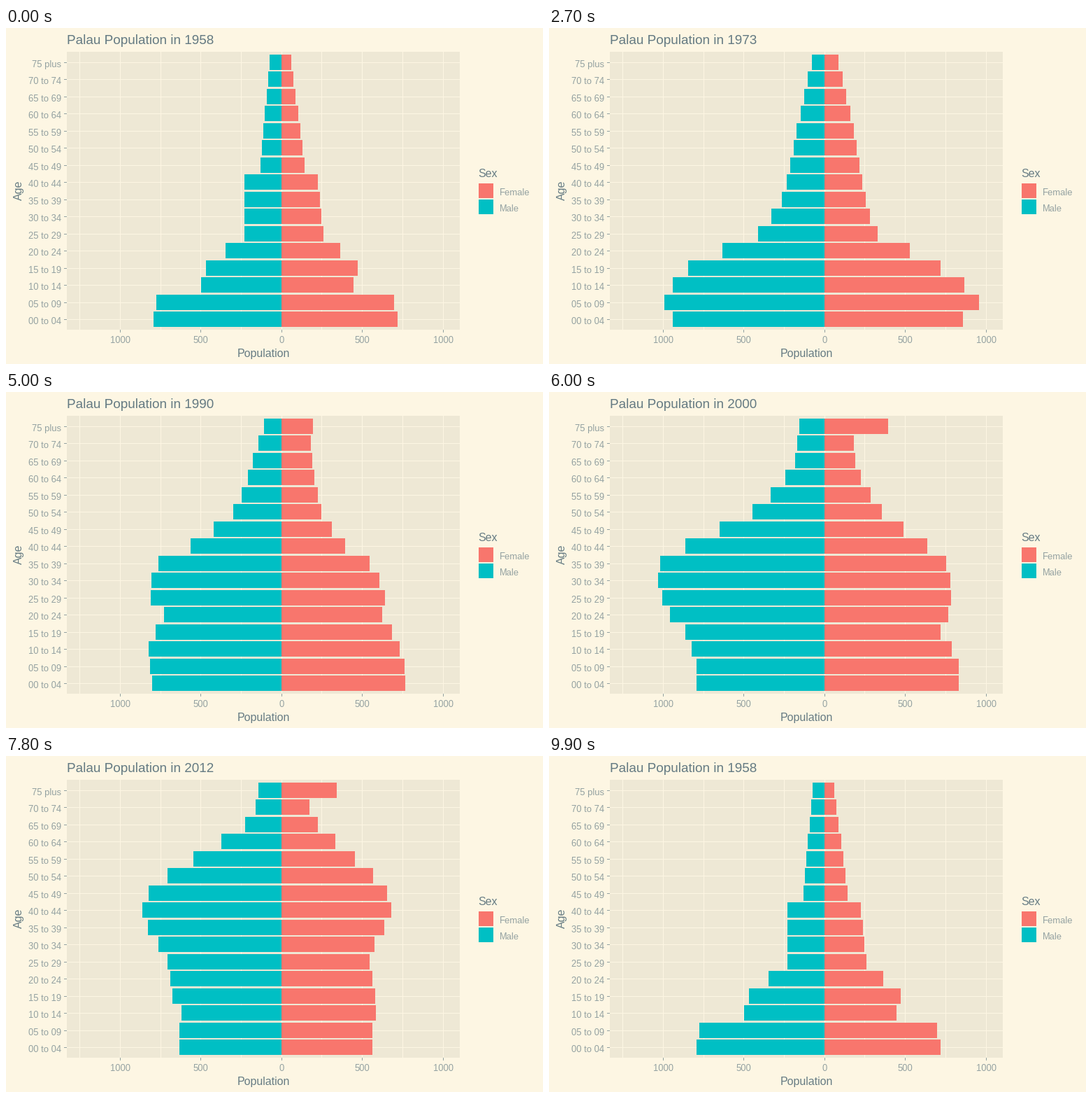
Write a matplotlib script that moves like this. It is 768 by 480 pixels and loops after 10000 ms.

```python
import matplotlib.pyplot as plt
import numpy as np
from matplotlib.animation import FuncAnimation
from matplotlib.patches import Rectangle

plt.rcParams["text.hinting"] = "native"
plt.rcParams["font.family"] = "Liberation Sans"

W, H, DPI = 768, 480, 96
PAPER, PANEL = "#fdf6e3", "#eee8d5"
DARK, SOFT = "#657b83", "#93a1a1"
RED, TEAL = "#f8766d", "#00bfc4"
ZERO, STEP = 394, 24.4667
AGES = [f"{a:02d} to {a + 4:02d}" for a in range(0, 75, 5)] + ["75 plus"]
N = len(AGES)


def profile(groups, male, female):
    """Bar lengths of all age groups, straight between a few bends."""
    return np.array([np.interp(range(N), groups, side) for side in (male, female)])


pyramid = {
    1958: profile([0, 1, 2, 3, 5, 8, 9, 15],
                  [183, 179, 115, 108, 53, 53, 30, 17],
                  [166, 161, 103, 109, 60, 52, 33, 14]),
    1967: profile([0, 2, 3, 4, 5, 9, 11, 15],
                  [238, 196, 154, 70, 48, 49, 25, 20],
                  [217, 180, 148, 75, 55, 50, 31, 17]),
    1973: profile([0, 1, 2, 3, 5, 7, 11, 15],
                  [220, 235, 228, 197, 82, 58, 40, 18],
                  [200, 229, 210, 166, 67, 59, 42, 19]),
    1990: profile([0, 2, 4, 5, 7, 8, 10, 15],
                  [182, 190, 157, 183, 171, 120, 64, 24],
                  [172, 170, 137, 144, 121, 82, 54, 38]),
    2005: profile([0, 2, 3, 4, 6, 8, 11, 14, 15],
                  [158, 223, 165, 165, 251, 257, 91, 28, 40],
                  [156, 215, 172, 128, 183, 185, 80, 32, 120]),
    2015: profile([0, 1, 3, 4, 6, 9, 11, 14, 15],
                  [145, 144, 140, 152, 184, 196, 141, 31, 33],
                  [124, 140, 129, 109, 135, 163, 121, 38, 68]),
}


def aged(rows, years):
    """Move everyone but the open last group up by some years."""
    i = np.arange(N - 1)
    return np.array([np.append(np.interp(i - years / 5, i, row[:-1]), row[-1])
                     for row in rows])


def estimate(year, before, after, young, scale):
    t = (year - before) / (after - before)
    rows = scale * ((1 - t) * aged(pyramid[before], year - before)
                    + t * aged(pyramid[after], year - after))
    rows[:, :2] = np.reshape(young, (2, 1))
    pyramid[year] = rows


estimate(1970, 1967, 1973, (204, 212), 1)
estimate(1980, 1973, 1990, (205, 191), 0.88)
estimate(1986, 1973, 1990, (209, 190), 0.94)
estimate(2000, 1990, 2005, (175, 190), 1.12)
estimate(1995, 1990, 2000, (195, 195), 1)
estimate(2012, 2005, 2015, (146, 130), 0.94)
pyramid[2020] = 0.945 * aged(pyramid[2015], 5)

YEARS = sorted(pyramid)
STARTS = [3, 11, 19, 27, 35, 43, 50, 58, 66, 74, 82, 89, 96]

fig = plt.figure(figsize=(W / DPI, H / DPI), dpi=DPI, facecolor=PAPER)
ax = fig.add_axes([0, 0, 1, 1])
ax.set_xlim(0, W)
ax.set_ylim(H, 0)
ax.axis("off")


def box(x, y, w, h, color, z=1):
    patch = Rectangle((x, y), w, h, fc=color, lw=0, antialiased=False, zorder=z)
    return ax.add_patch(patch)


def label(x, y, text, px, color, ha="left", **kw):
    return ax.text(x, y, text, size=px * 72 / DPI, color=color, ha=ha,
                   va="baseline", **kw)


box(87, 34, 562, 397, PANEL)
for k in np.arange(-2.5, 2.5, 0.5):
    x = round(393.75 + 115.4 * k)
    box(x, 34, 1, 397, PAPER)
for k in range(-2, 3):
    x = round(393.75 + 115.4 * k)
    box(x, 34, 1, 397, PAPER)
    box(x, 431, 1, 4, SOFT)
    label(x + 0.3, 450, str(abs(k) * 500), 13, SOFT, "center")

tops = [round(38 + STEP * (N - 1 - i)) for i in range(N)]
for top, age in zip(tops, AGES):
    box(87, top + 11, 562, 1, PAPER)
    box(83, top + 11, 4, 1, SOFT)
    label(79, top + 18, age, 13, SOFT, "right")

left_bars = [box(ZERO, top, 0, 22, TEAL, 3) for top in tops]
right_bars = [box(ZERO, top, 0, 22, RED, 3) for top in tops]

title = label(87, 23, "", 18.85, DARK)
label(368, 470, "Population", 16, DARK, "center")
label(23, 232, "Age", 16, DARK, "center", rotation=90, rotation_mode="anchor")
label(675, 213, "Sex", 16, DARK)
for y, color, name in [(222, RED, "Female"), (245, TEAL, "Male")]:
    box(676, y, 21, 21, color)
    label(706, y + 17, name, 13, SOFT)


def draw(frame):
    k = sum(start <= frame for start in STARTS)
    old, new, t = YEARS[k - 1], YEARS[k % len(YEARS)], 1
    if k:
        steps = 5 if STARTS[k - 1] < 80 else 4
        t = min(1, (frame - STARTS[k - 1] + 1) / steps)
    lengths = np.rint((1 - t) * pyramid[old] + t * pyramid[new])
    for left, right, m, f in zip(left_bars, right_bars, *lengths):
        left.set_x(ZERO - m)
        left.set_width(m)
        right.set_width(f)
    title.set_text(f"Palau Population in {new if t >= 0.5 else old}")
    return [*left_bars, *right_bars, title]


anim = FuncAnimation(fig, draw, frames=100, interval=100, repeat=True,
                     repeat_delay=0, blit=False)
plt.show()
```
